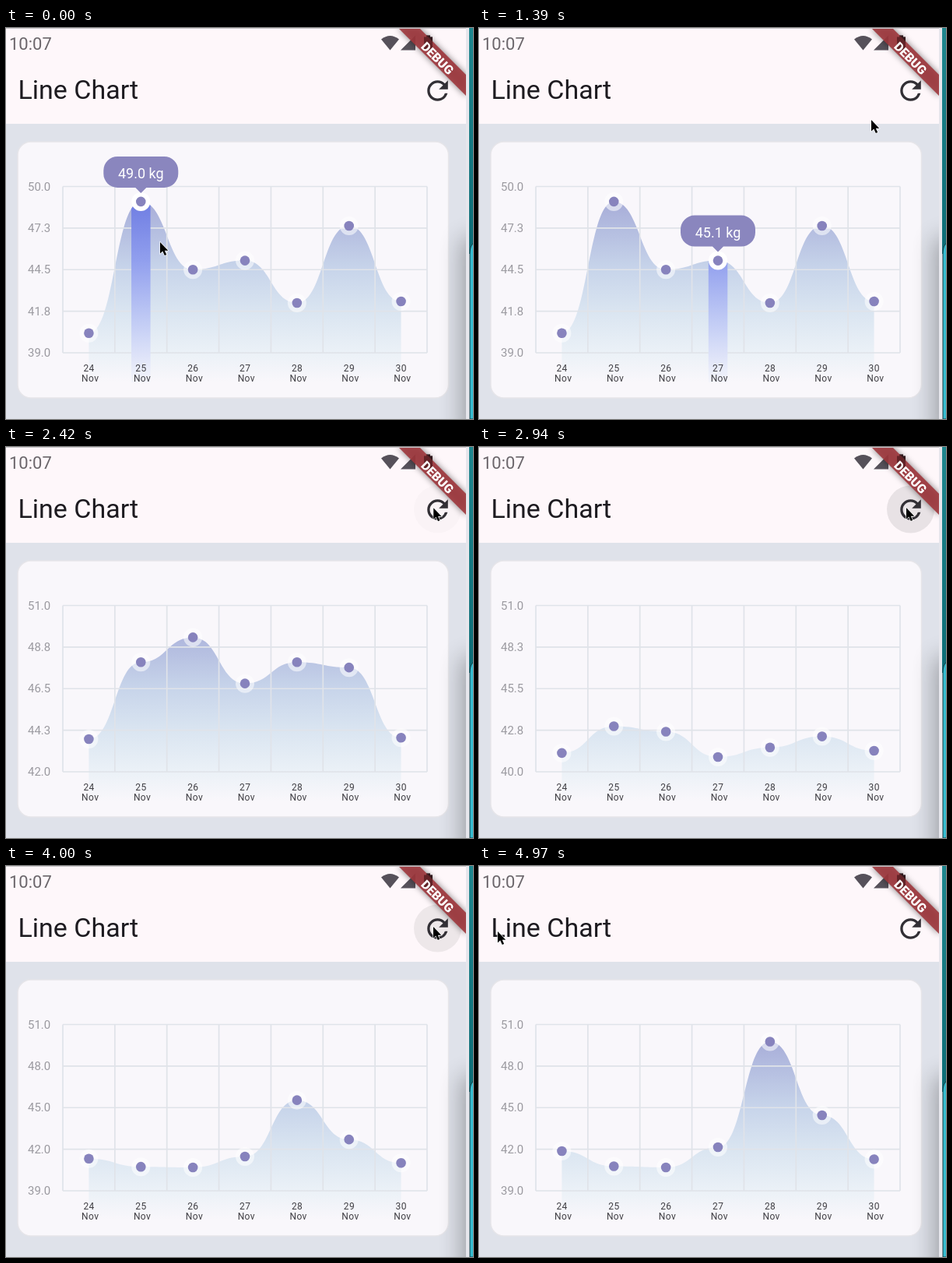
Write an HTML page that moves like this. It is 600 px wide and 502 px high and loops after 5 s.

```html
<!DOCTYPE html>
<html lang="en">
<head>
<meta charset="utf-8">
<title>Line Chart</title>
<style>
  html, body { margin: 0; width: 100%; height: 100%; overflow: hidden; background: #dfe2ea; }
  svg { display: block; width: 600px; height: 502px; font-family: Roboto, sans-serif; }
  .axis { font-size: 15px; fill: #9b9aa0; }
  .day { font-size: 12px; letter-spacing: .4px; fill: #3f3e43; text-anchor: middle; }
</style>
</head>
<body>
<svg viewBox="0 0 600 502">
  <defs>
    <linearGradient id="fill" gradientUnits="userSpaceOnUse" x1="0" y1="203" x2="0" y2="455">
      <stop offset="0" stop-color="#a0a3d3"/>
      <stop offset=".2" stop-color="#b2bbdf"/>
      <stop offset=".42" stop-color="#c7d4ea"/>
      <stop offset=".64" stop-color="#dae5f1"/>
      <stop offset=".85" stop-color="#ebf1f7"/>
      <stop offset="1" stop-color="#f9f7fb"/>
    </linearGradient>
    <linearGradient id="barFill" gradientUnits="userSpaceOnUse" x1="0" y1="203" x2="0" y2="455">
      <stop offset="0" stop-color="#6674df"/>
      <stop offset=".38" stop-color="#919fee"/>
      <stop offset=".7" stop-color="#c3cdf5"/>
      <stop offset="1" stop-color="#f4f5fb"/>
    </linearGradient>
    <linearGradient id="teal" x1="0" y1="0" x2="0" y2="1">
      <stop offset="0" stop-color="#1f878f"/>
      <stop offset="1" stop-color="#0c6c76"/>
    </linearGradient>
    <filter id="soft" x="-200%" y="-50%" width="500%" height="200%"><feGaussianBlur stdDeviation="15"/></filter>
    <filter id="glow" x="-20%" y="-50%" width="140%" height="200%"><feGaussianBlur stdDeviation="4"/></filter>
    <clipPath id="screen"><rect width="591" height="502"/></clipPath>
    <clipPath id="under"><path id="areaClip"/></clipPath>
  </defs>

  <rect width="600" height="502" fill="#dfe2ea"/>
  <rect width="591" height="123" fill="#fef7fa"/>
  <rect x="15" y="146" width="553.5" height="329" rx="17" fill="#f9f7fb" stroke="#e6e5e9" stroke-width="1.5"/>

  <path id="area" fill="url(#fill)"/>
  <path id="grid" fill="none" stroke="#e0e3e9" stroke-width="1.7"/>
  <rect id="bar" y="203" width="24.5" height="252" fill="url(#barFill)" clip-path="url(#under)"/>
  <g id="labels"></g>
  <g id="dots"></g>
  <g id="tip">
    <path d="M-30-58H30a18 18 0 0 1 18 18v4a18 18 0 0 1-18 18H7L0-11-7-18H-30a18 18 0 0 1-18-18v-4a18 18 0 0 1 18-18Z" fill="#8a86be"/>
    <text id="tipText" y="-30" font-size="18" fill="#fff" text-anchor="middle"></text>
  </g>

  <text x="4" y="27.5" font-size="22" fill="#6b666b">10:07</text>
  <text x="15.5" y="91" font-size="34" fill="#1d1b20">Line Chart</text>
  <g fill="#56515a">
    <path d="M482 14.5Q493.500 5.500 505 14.500L493.500 28.500Z"/>
    <path d="M526 9.500V28.500H507Z"/>
    <path d="M537 11.500h3V9.500h5v2h3V28.500H537Z" fill="#2f282d"/>
  </g>

  <circle id="ripple" cx="554.5" cy="80"/>
  <path transform="translate(534.6 60.6) scale(1.66)" fill="#322f35" d="M17.650 6.350A7.960 7.960 0 0 0 12 4c-4.420 0-8 3.580-8 8s3.580 8 8 8c3.730 0 6.840-2.550 7.730-6h-2.080A6 6 0 0 1 12 18c-3.310 0-6-2.690-6-6s2.690-6 6-6c1.660 0 3.140.690 4.220 1.780L13 11h7V4z"/>

  <g clip-path="url(#screen)">
    <path d="M504 0H531L592 61V88Z" fill="#000" opacity=".5" filter="url(#glow)"/>
    <path d="M504 0H531L592 61V88Z" fill="#a0383e" opacity=".9"/>
    <path d="M537 11.500h3V9.500h5v2h3V28.500H537Z" fill="#3a1418" opacity=".55"/>
    <text transform="translate(554.5 38.5) rotate(45)" y="6" font-size="16" font-weight="900" fill="#fff" text-anchor="middle">DEBUG</text>
    <rect x="586" y="270" width="40" height="260" fill="#000" opacity=".3" filter="url(#soft)"/>
  </g>

  <rect width="600" height="1" fill="#c9c5c9"/>
  <rect x="591" width="4" height="502" fill="#e6e6ec"/>
  <rect x="595" width="5" height="290" fill="url(#teal)"/>
  <path d="M601 276Q596 279 596 290V502H601Z" fill="#35bcd0" stroke="#123c44"/>

  <path id="cursor" d="M0 0V14.500L3.300 11.400 5.800 17 8.200 16 5.800 10.700H10.300Z" fill="#000" stroke="#fff" stroke-width="1.200" paint-order="stroke"/>
</svg>

<script>
const LOOP = 5000, GROW = 700;
const LEFT = 73, RIGHT = 541, TOP = 203.5, BOTTOM = 417, COL = (RIGHT - LEFT) / 7;

const charts = [
  { start: -GROW, lo: 39, hi: 50, values: [40.3, 49, 44.5, 45.1, 42.3, 47.4, 42.4] },
  { start: 1893, lo: 42, hi: 51, values: [43.77, 48.1, 49.5, 46.9, 48.1, 47.8, 43.85] },
  { start: 2766, lo: 40, hi: 51, values: [42.09, 49.57, 48.05, 40.98, 43.64, 46.73, 42.72] },
  { start: 3746, lo: 39, hi: 51, values: [41.87, 40.77, 40.69, 42.15, 49.76, 44.45, 41.28] }
];
// [press, fade start]
const taps = [[1780, 2080], [2650, 2850], [3630, 3840]];
// [time, x, y]
const path = [
  [0, 198, 275], [150, 201, 276], [550, 240, 282], [950, 306, 284], [1000, 308, 283],
  [1390, 504, 118], [1700, 550, 79], [2760, 549, 78], [4620, 549, 78], [4970, 24, 84], [5000, 24, 84]
];
const DRAG_END = 1000;

const $ = id => document.getElementById(id);
const clamp = x => Math.max(0, Math.min(1, x));
const mix = (a, b, k) => a + (b - a) * k;
const xAt = i => LEFT + COL * (i + .5);

function add(parent, tag, attrs, text = '') {
  const el = document.createElementNS('http://www.w3.org/2000/svg', tag);
  for (const name in attrs) el.setAttribute(name, attrs[name]);
  el.textContent = text;
  return parent.appendChild(el);
}

// cubic-bezier(.4, 0, .2, 1)
function ease(x) {
  let lo = 0, hi = 1, s = .5;
  for (let i = 0; i < 22; i++) {
    s = (lo + hi) / 2;
    const px = 1.2 * s * (1 - s) ** 2 + .6 * s * s * (1 - s) + s ** 3;
    if (px < x) lo = s; else hi = s;
  }
  return x >= 1 ? 1 : s * s * (3 - 2 * s);
}

function cursorAt(t) {
  const i = path.findIndex(p => p[0] > t);
  const a = path[i - 1], b = path[i], k = clamp((t - a[0]) / (b[0] - a[0]));
  const s = k * k * (3 - 2 * k);
  return [mix(a[1], b[1], s), mix(a[2], b[2], s)];
}

let lines = '';
for (let i = 0; i < 8; i++) lines += `M${LEFT + COL * i} ${TOP}V${BOTTOM}`;
const ticks = [0, 1, 2, 3, 4].map(i => {
  const y = mix(BOTTOM, TOP, i / 4);
  lines += `M${LEFT} ${y}H${RIGHT}`;
  return add($('labels'), 'text', { class: 'axis', x: 28, y: y + 5.2 });
});
$('grid').setAttribute('d', lines);

const dots = charts[0].values.map((_, i) => {
  const x = xAt(i);
  add($('labels'), 'text', { class: 'day', x: x + .2, y: 440.5 }, 24 + i);
  add($('labels'), 'text', { class: 'day', x: x + 1.8, y: 454 }, 'Nov');
  const g = add($('dots'), 'g', {});
  const halo = add(g, 'circle', { r: 12, fill: '#fff' });
  add(g, 'circle', { r: 6.3, fill: '#8783bd' });
  return { g, halo };
});

function draw(t) {
  const { start, lo, hi, values } = charts.filter(c => c.start <= t).pop();
  const k = ease(clamp((t - start) / GROW)), min = Math.min(...values);
  const ys = values.map(v => mix(BOTTOM, TOP, (mix(min, v, k) - lo) / (hi - lo)));
  const [cx, cy] = cursorAt(t);
  const dragX = cursorAt(Math.min(t, DRAG_END))[0];
  const picked = start < 0 ? Math.floor((dragX - LEFT) / COL) : -1;

  let d = `M${xAt(0)} 455V${ys[0]}`;
  for (let i = 1; i < 7; i++) {
    const mid = LEFT + COL * i;
    d += `C${mid} ${ys[i - 1]} ${mid} ${ys[i]} ${xAt(i)} ${ys[i]}`;
  }
  d += 'V455Z';
  $('area').setAttribute('d', d);
  $('areaClip').setAttribute('d', d);

  ticks.forEach((el, i) => el.textContent = mix(lo, hi, i / 4).toFixed(1));
  dots.forEach(({ g, halo }, i) => {
    g.setAttribute('transform', `translate(${xAt(i)} ${ys[i]})`);
    halo.setAttribute('opacity', i === picked ? 1 : .55);
  });

  const shown = picked < 0 ? 'none' : '';
  $('tip').style.display = $('bar').style.display = shown;
  if (picked >= 0) {
    $('bar').setAttribute('x', xAt(picked) - 12.2);
    $('tip').setAttribute('transform', `translate(${xAt(picked)} ${ys[picked]})`);
    $('tipText').textContent = values[picked].toFixed(1) + ' kg';
  }

  const tap = taps.filter(p => p[0] <= t).pop();
  const age = tap ? t - tap[0] : 0;
  $('ripple').setAttribute('r', mix(10, 30.5, clamp(age / 225)));
  $('ripple').setAttribute('opacity', tap ? .11 * clamp(age / 75) * (1 - clamp((t - tap[1]) / 400)) : 0);
  $('cursor').setAttribute('transform', `translate(${cx} ${cy})`);
}

function tick() {
  draw(performance.now() % LOOP);
  requestAnimationFrame(tick);
}
tick();
</script>
</body>
</html>
```
